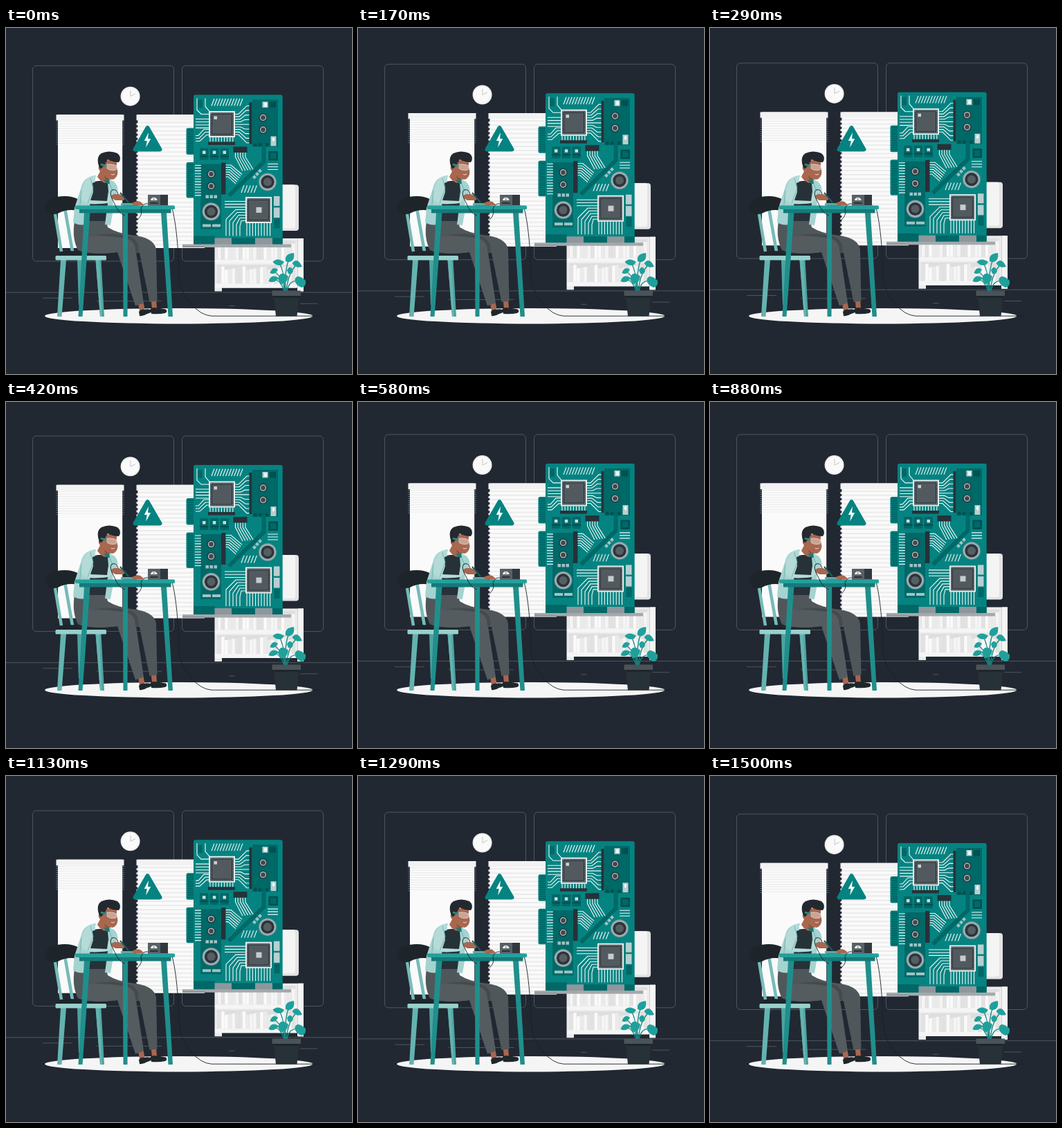
Animation of 500 by 500 pixels, one loop 1.54 s. Source, as an HTML page:

```html
<!DOCTYPE html>
<html lang="en">
<head>
<meta charset="utf-8">
<title>Electronics workbench</title>
<style>
html, body { margin: 0; height: 100%; overflow: hidden; background: #212832; }
svg { display: block; width: 100vw; height: 100vh; }
.line { fill: none; stroke: #f2fafa; stroke-width: 1.1; }
.thin { fill: none; stroke: #5b6169; stroke-width: .8; }
.wire { fill: none; stroke: #1a2026; stroke-width: .9; }
.dark { fill: #006867; }
.black { fill: #263238; }
.pale { fill: #a5d3d1; }
</style>
</head>
<body>
<svg viewBox="0 0 500 500">
  <defs>
    <g id="knob"><circle r="6" fill="#263238"/><circle r="4.7" fill="#a9b7ba"/><circle r="3.2" fill="#3d474c"/></g>
    <g id="coil"><circle r="13" fill="#6f9496"/><circle r="12" fill="#9fafb3"/><circle r="9.6" fill="#2b353b"/><circle r="6" fill="#565e62"/></g>
    <g id="chip"><path fill="#e6f1f1" d="M0 0h38v38H0z"/><path class="black" d="M2 2h34v34H2z"/><path fill="none" stroke="#a8b0b3" stroke-width="1.6" stroke-dasharray="1 1.2" d="M3.2 3.2h31.6v31.6H3.2z"/><path fill="#525a5f" d="M5 5h28v28H5z"/></g>
    <g id="module"><path class="dark" d="M0 0h12.5v17H0z"/><path fill="#004f50" d="M0 11h12.5v2H0z"/><path fill="#c9dddd" d="M4 4h4.5v4.5H4z"/></g>
  </defs>

  <g id="room">
    <rect class="thin" x="38.5" y="55" width="204" height="282.5" rx="5.5"/>
    <rect class="thin" x="254.5" y="55" width="204" height="282.5" rx="5.5"/>
    <path class="thin" d="M0 382.6H500M53 390.8H96M131 395.2H225M322 402H331M425 398.8H450"/>
    <circle cx="179.6" cy="99.2" r="14" fill="#ebebeb"/>
    <circle cx="179.6" cy="99.2" r="12.3" fill="#fafafa"/>
    <path d="M180 90.5V99.3L187 95.5" fill="none" stroke="#c4c4c4"/>

    <path fill="#fafafa" d="M75 125.7H168.2V318.5H75z"/>
    <path fill="#f2f2f2" d="M72.5 125.7H170.5V134H72.5z"/>
    <path id="stack" stroke="#e8e8e8" stroke-width=".8"/>
    <path id="stackEnds" stroke="#65707a" stroke-width="1.1"/>
    <path fill="#fafafa" d="M190.5 125.7H287V318.5H190.5z"/>
    <path fill="#f2f2f2" d="M188.5 125.7H287V134H188.5z"/>
    <path id="slats" stroke="#ebebeb" stroke-width="2"/>
    <path id="slatEnds" stroke="#fafafa" stroke-width="3"/>

    <rect x="392" y="227" width="31" height="66.5" rx="4" fill="#e3e3e3"/>
    <rect x="392" y="227" width="26" height="63" rx="3" fill="#f4f4f4"/>
    <path fill="#ebebeb" d="M301.5 304.5H430V381H421V376H312V381H301.5z"/>
    <path fill="#dedede" d="M305 308H418V335H305zM305 343H418V370H305z"/>
    <g id="books"></g>
    <path fill="#f5f5f5" d="M302 335.5H420V341H302zM302 370H420V376H302zM422 304.5H430V381H422z"/>
    <path stroke="#cfcfcf" d="M421.5 305V376"/>

    <g id="board">
      <path fill="#007b79" d="M272 145H263Q260.500 145 260.500 148V181Q260.500 183.500 263 183.500H272zM272 194.500H263Q260.500 194.500 260.500 197V243.500Q260.500 246 263 246H272z"/>
      <path id="fingers" stroke="#00605f" stroke-width="1.4"/>
      <rect x="271" y="97" width="128.700" height="216.500" rx="3" fill="#058381"/>
      <path class="dark" d="M356 104H393V172H356zM281 197H311V291H281zM271 301H302V313.500H271zM326 304H360V313.500H326zM385 304H399.700V313.500H385zM277 104H284V116H277zM387.500 276H395.500V290H387.500z"/>
      <path d="M372.500 172V194L322 243" fill="none" stroke="#006867" stroke-width="6"/>
      <path id="traces" class="line"/>
      <path class="black" d="M351.500 108H355.500V168H351.500zM292 165H331V169.500H292zM328.500 172H348.500V180.500H328.500zM311 195H317.500V241H311z"/>
      <use href="#chip" x="293" y="120.500"/>
      <path fill="#cdd3d5" d="M300.500 128H305V132.500H300.500z"/>
      <use href="#chip" x="346" y="244.500"/>
      <path fill="#c6ccce" d="M361.500 259.500H369.500V267.500H361.500z"/>
      <use href="#module" x="280" y="174"/><use href="#module" x="294.800" y="174"/><use href="#module" x="309.500" y="174"/>
      <path fill="#b9cfd0" d="M370.500 107H378.500V115.500H370.500zM382.500 157H390.500V171H382.500zM387 243.500H395.500V257.500H387zM387 260H395.500V274.500H387z"/>
      <path fill="#f1f7f7" d="M373 108.500H377V114H373zM385 159H388V164H385z"/>
      <path fill="#00504f" d="M381 107H390V115.500H381zM358 167H362.500V171.500H358zM365 167H369.500V171.500H365zM375 167H379.500V171.500H375zM379.500 178.500H393V192H379.500z"/>
      <path fill="#006867" d="M382 181H390.500V189.500H382z"/>
      <path fill="#9fc3c4" d="M288.500 242H293V246.500H288.500zM294.500 242H299V246.500H294.500zM300.500 242H305V246.500H300.500zM284 284H296V288H284zM298 284H310V288H298zM364 207l3-3 3 3-3 3zM360 211.500l3-3 3 3-3 3zM356 216l3-3 3 3-3 3z"/>
      <use href="#knob" x="371.500" y="130"/><use href="#knob" x="371.500" y="147.500"/>
      <use href="#knob" x="296.500" y="211.500"/><use href="#knob" x="296.500" y="229"/>
      <use href="#coil" x="378" y="223"/><use href="#coil" x="296.500" y="265.800"/>
    </g>
    <path fill="#8e979c" d="M301.500 304H326V314H301.500zM360 304H385V314H360z"/>
    <path fill="#a3a8ab" d="M255 313H412V317.500H255z"/>
    <path fill="#858b8f" d="M255 316H287V317.500H255z"/>
  </g>

  <ellipse cx="249.700" cy="416.200" rx="193.700" ry="11.200" fill="#f5f5f5"/>
  <path fill="#058381" stroke="#058381" stroke-width="6" stroke-linejoin="round" d="M204.500 144.200L222.500 175.400H186.500z"/>
  <path fill="#fff" d="M206 151L199.800 163H203.800L202.200 172.500L209.200 160H205z"/>
  <path class="wire" d="M234 257Q239 257 241 264C246 285 249 320 250 350C250 372 255 384 267 398Q281 415 297 416.200H455"/>

  <g id="plant">
    <path fill="none" stroke="#128783" stroke-width="1.300" d="M404 381Q402 352 409 333M403 381Q402 350 395 340M405 380Q408 353 420 342M402 381Q398 366 388 363M406 381Q409 362 425 366M403 380Q398 357 387 352"/>
    <path fill="#20a09b" d="M404 337Q402 326 416 325Q418 337 408 338.500zM402 338Q392 331 385.500 338Q391 345 399 342zM413.500 340Q421 330 428 345Q419 348 413.500 340zM393 349Q385 343 381.500 354Q388 358 393 349zM406 350Q411 341 415 351Q413 357 408 355zM394 361Q388 370 379.500 366Q383 354 394 361zM393 363Q396 349 408 359Q406 371 397 370zM417.500 363Q421 354 433 365Q434 374 427 375Q417 371 417.500 363z"/>
    <path fill="#4a5359" d="M384.500 379.500H426V387H384.500z"/>
    <path class="black" d="M387 387H423.500L420.500 416.500H390z"/>
    <path fill="#1c262b" d="M387 387H423.500L423 390H387.500z"/>
  </g>

  <g id="chair">
    <path stroke="#76bbb7" stroke-width="4.500" d="M70.500 266L80 323M85.500 263L96 323"/>
    <path fill="#1e252a" d="M57 260Q56 247 74 244Q93 241 105 248L104 264Q88 261 75 268Q59 273 57 260zM76 326Q84 320 103 323L118 329H76z"/>
    <path fill="#4da39f" d="M103 335H110L109 400H105zM129.500 335H137.500L142 417H136z"/>
    <path fill="#64b3af" d="M79 335H87L80.500 417H74zM129.500 335H135L139 417H136z"/>
    <rect x="71.500" y="329" width="73.500" height="6.500" rx="1.500" fill="#97d0cc"/>
  </g>

  <g id="technician">
    <path fill="#a8674e" d="M191 398L198.500 396 200.500 407 193 409zM209.500 392H217L218 405H211z"/>
    <path fill="#20272c" d="M192 410Q195 406 200 407Q205 405 211 408Q210 412 204 413Q198 417 193 416zM208.500 406Q212 403 218 404.500Q224 405 231 406.500Q234 410 230 412Q221 414 210 413z"/>
    <path fill="#50575b" d="M99 279H145L147 288Q160 296 180 299Q214 302 217 320L218.500 394.500 207.500 396 193 325 161 324Q121 329 104 321Q95 304 99 279z"/>
    <path fill="#555c60" d="M115 302Q155 297 177 304Q187 309 188 324L199 397.500 187 401.500 161 324Q125 328 108 322z"/>
    <path fill="#444b4f" d="M126 300Q155 294 181 302Q194 309 191 325L187 323Q187 309 177 305Q154 300 126 300z"/>
    <path class="black" d="M124 222L148 220 153 236 147 281H119L120 240z"/>
    <path fill="#50575b" d="M117 279H145V286H117z"/>
    <path class="pale" d="M130 213Q112 215 109 229L99 260 97 281Q106 286 114 284L121 257 126 231zM145 217L156 222Q163 228 161 238L155 243 154 268 151 285 143 284 147 253 145 229z"/>
    <path fill="#b4dbd8" d="M129 213Q113 215 110 233Q107 246 111 250Q117 257 147 253L154 247 150 239 126 241 129 228z"/>
    <path class="black" d="M125 224L134 221 147 224 148 236 146 250 122 249 126 237z"/>
    <path fill="none" stroke="#76b4b0" d="M122 217L126 232 118 253M109 235L106 264M150 225L154 236"/>
    <path fill="#a8674e" d="M138 195Q148 188 160 193L160 201 161.500 208Q161 217 154 219L148 218 149 223Q140 227 132 215L136 207Q132 203 135 199z"/>
    <path fill="#8d513e" d="M142 213Q146 218 152 219L148 220 148 223Q143 220 142 213z"/>
    <path fill="#23292e" d="M134 199Q130 186 138 181Q149 176 161 181Q168 187 163 194Q154 194 147 190Q143 198 138 203Q135 204 134 199z"/>
    <path d="M137 197L147 200" stroke="#22928e" stroke-width="2.5"/>
    <path fill="#fff" fill-opacity=".4" stroke="#e3d8d3" stroke-width=".7" d="M146 197Q153 196 160 199L159 205Q151 207 146 203z"/>
    <path d="M152 211.500Q154.500 213 157 211" fill="none" stroke="#fff" stroke-width=".8"/>
    <path fill="#167a77" d="M141 218Q145 222 149 219L150 225Q144 226 141 218z"/>
  </g>

  <g id="bench">
    <path fill="#1f8f8c" d="M113 267H121.500L110.500 417H104.500zM168.800 267H176.200L175.500 417H169.500zM224 267H232L241 417H234.500z"/>
    <path fill="#157a78" d="M106 262H238.500V267.500H106z"/>
    <rect x="100" y="256.500" width="144" height="5.500" rx="1.500" fill="#24a09c"/>
    <path fill="#31383d" d="M205 241H234V256.500H205z"/>
    <path fill="#596166" d="M205 241H223V256.500H205z"/>
    <path fill="#fff" d="M209 249A4.800 4.800 0 0 1 218.500 249z"/>
    <path stroke="#263238" d="M213.800 248.500V246"/>
    <path fill="#263238" d="M208 252H219.500V254H208z"/>
    <path fill="#5fa8a6" d="M166 253H188V256.500H166z"/>
    <path fill="#a8674e" d="M152 242Q158 238 166 241L172 246 170 249 158 249 153 246zM182 253Q189 249 194 251L199 255Q197 257 184 256.500z"/>
    <path stroke="#17605f" stroke-width="2" d="M165 238L177 252"/>
    <path class="wire" d="M162 240Q160 232 153 234Q148 239 156 252Q162 268 172 271M205 254Q198 253 195 261Q198 270 190 277"/>
  </g>
</svg>
<script>
const $ = id => document.getElementById(id);
const repeat = (n, draw) => Array.from({ length: n }, (_, i) => draw(i)).join('');
const setPath = (id, ...parts) => $(id).setAttribute('d', parts.join(''));

setPath('stack', repeat(10, i => `M75 ${135.5 + i * 3.5}H168`));
setPath('stackEnds', repeat(12, i => `M72.500 ${135.5 + i * 3}h2.500M168.200 ${135.5 + i * 3}h2.500`));
setPath('slats', repeat(30, i => `M190.500 ${137 + i * 6.1}H287`));
setPath('slatEnds', repeat(30, i => `M188.500 ${139.5 + i * 6.1}h3`));
setPath('fingers',
  repeat(11, i => `M262.500 ${148 + i * 3.2}H271`),
  repeat(15, i => `M262.500 ${198 + i * 3.2}H271`),
  'M273.500 148V181');

$('books').innerHTML = repeat(44, i => {
  const col = i % 22, h = 20 + (i * 7) % 6, floor = i < 22 ? 335 : 370;
  const shade = ['#f5f5f5', '#ebebeb', '#fafafa', '#e2e2e2'][(i * 3 + (i >> 2)) % 4];
  return `<path fill="${shade}" d="M${306 + col * 5.1} ${floor}v${-h}h4.600v${h}z"/>`;
});

setPath('traces',
  // slanted marks
  repeat(11, i => `M${297 + i * 4.1} 113l4-10.500`),
  repeat(5, i => `M${340 + i * 4.6} 238.500l4-10.500`),
  // upper chip
  'M276 102V119L282 125H293M288 102V114L294 121',
  repeat(4, i => `M274 ${132 + i * 4.3}H293`),
  repeat(3, i => `M293 ${147 + i * 4}H${286 + i * 2}L${278 + i} ${156 + i * 4}H274`),
  repeat(9, i => {
    const d = (i - 4) * 3, y = 125 + i * 3.7, reach = Math.abs(d) / 3;
    return `M331 ${y}H${340 - reach}L${344 + reach} ${y + d}H352`;
  }),
  repeat(9, i => `M${295 + i * 4.1} 158.500V166`),
  // fan below the small bar
  repeat(5, i => `M${331.5 + i * 3.6} 180V187L${342 + i * 3.8} ${207 - i * .5}`),
  // edge comb and side bar
  repeat(12, i => `M273 ${199 + i * 3.95}H282`),
  repeat(6, i => `M317 ${198.5 + i * 3.4}H${325 - i * .8}L${341 - i * 1.8} ${212 + i * 2.7}`),
  'M378 197H393M378 201H393M378 205H393',
  // lower chip
  repeat(3, i => `M316 ${251 + i * 4.2}H346`),
  repeat(5, i => `M346 ${263 + i * 4}H${332 + i * 2}L${318 + i * 5} ${277 + i * 2.5}V301`),
  repeat(9, i => `M${348 + i * 4.2} 282V301`));

const LOOP = 1540, FRAMES = 37, FPS = 24, RISE = 10;

function render(now) {
  const frame = Math.min(FRAMES - 1, Math.floor((now % LOOP) * FPS / 1000 + .1));
  const phase = (frame + 1) / FRAMES;
  const lift = RISE * (1 - Math.abs(1 - 2 * phase));
  $('room').setAttribute('transform', `translate(0 ${-lift})`);
}

const start = performance.now();
function tick() {
  render(performance.now() - start);
  requestAnimationFrame(tick);
}
tick();
</script>
</body>
</html>
```
